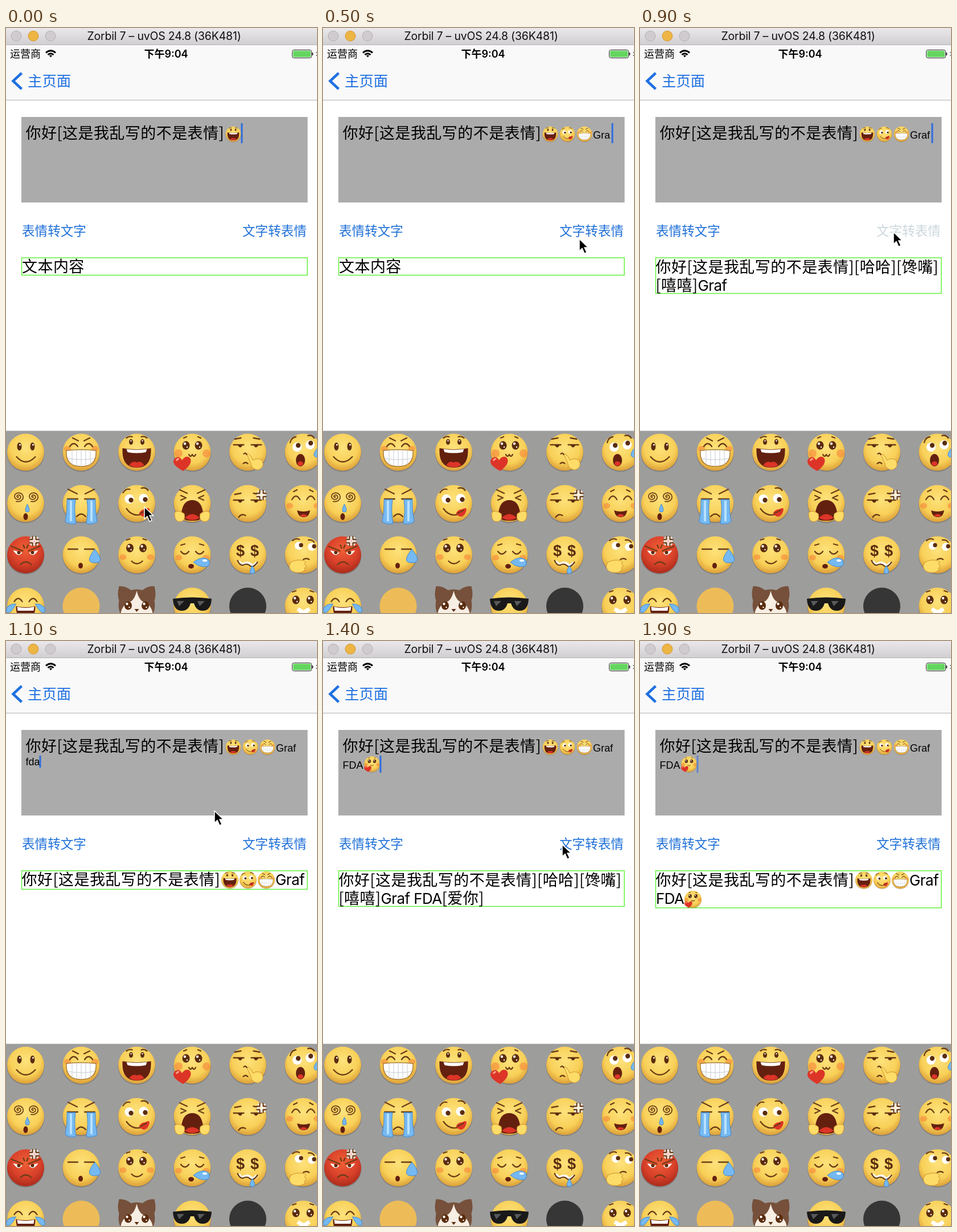
Animation of 546 by 1026 pixels, one loop 2 s. Source, as an HTML page:

```html
<!DOCTYPE html>
<html lang="zh-CN">
<head>
<meta charset="utf-8">
<title>表情键盘</title>
<style>
html, body { margin: 0; width: 100%; height: 100%; overflow: hidden; background: #fff; }
svg { display: block; }
text { font-family: "Noto Sans CJK SC", sans-serif; white-space: pre; }
.body { font-size: 27px; letter-spacing: .45px; }
.latin { font-family: Inter, "Noto Sans CJK SC", sans-serif; font-size: 26px; letter-spacing: -.6px; }
.small { font: 18px "Liberation Sans", sans-serif; }
.link { font-size: 22.6px; fill: #1f70d8; }
.line { fill: none; stroke: #6b3d16; stroke-width: 2.3; stroke-linecap: round; stroke-linejoin: round; }
.ink { fill: #5a2c0e; }
.mouth { fill: #64200f; }
.white { fill: #fff; }
.red { fill: #dd3428; }
.blush { fill: #f58038; opacity: .55; }
.tear { fill: #75b9f2; stroke: #4189d2; }
.hand { fill: #fddc68; stroke: #cf9130; }
.burst { fill: none; stroke: #fff; stroke-width: 5.5; }
</style>
</head>
<body>
<svg width="546" height="1026" viewBox="0 0 546 1026">
  <defs>
    <linearGradient id="bar" x2="0" y2="1"><stop stop-color="#ebe8eb"/><stop offset="1" stop-color="#d1ced1"/></linearGradient>
    <radialGradient id="skin" cy=".38" r=".64"><stop stop-color="#fde27c"/><stop offset=".65" stop-color="#f8d058"/><stop offset="1" stop-color="#d99a35"/></radialGradient>
    <radialGradient id="rage" cy=".35" r=".66"><stop stop-color="#ef6036"/><stop offset=".6" stop-color="#d9412a"/><stop offset="1" stop-color="#a92a1a"/></radialGradient>
    <g id="faces"></g>
  </defs>
  <rect width="546" height="1026" fill="#fff"/>
  <rect y="30" width="546" height="97" fill="#f9f9f9"/>
  <path d="M0 126.5H546" stroke="#b2b2b2"/>
  <rect width="546" height="30" fill="url(#bar)"/>
  <path d="M0 29.5H546" stroke="#b5b2b5"/>
  <g fill="#cfcbce" stroke="#b3b0b3">
    <circle cx="18" cy="14" r="9"/>
    <circle cx="48" cy="14" r="9" fill="#edb544" stroke="#d29a35"/>
    <circle cx="78" cy="14" r="9"/>
  </g>
  <text class="latin" x="277.5" y="21" text-anchor="middle" style="font-size:19.500px;letter-spacing:-.2px" fill="#111">Zorbil 7 – uvOS 24.8 (36K481)</text>
  <text x="7" y="52" font-size="18">运营商</text>
  <g fill="none" stroke="#000" stroke-width="3">
    <path d="M70 43.5Q78.500 36 87 43.5M73.500 47Q78.500 42.500 83.500 47"/>
    <path d="M76 48.500Q78.500 46.500 81 48.500L78.500 51.500Z" fill="#000" stroke="none"/>
  </g>
  <text x="281" y="51.500" text-anchor="middle" class="latin" style="font-size:18px;letter-spacing:0" font-weight="600">下午9:04</text>
  <rect x="502.5" y="38.5" width="34" height="14" rx="3" fill="#f9f9f9" stroke="#222"/>
  <rect x="504" y="40" width="31" height="11" rx="1.5" fill="#64d65f"/>
  <path d="M538 43v5q2-2.500 0-5M544.500 42l1.500 2M544.500 49l1.500-2" stroke="#222"/>
  <path d="M27.500 79L12.500 93L27.500 107" fill="none" stroke="#1f70e2" stroke-width="4.500"/>
  <text x="38" y="102" font-size="25.4" fill="#1f70e2">主页面</text>

  <rect x="27" y="156" width="502.500" height="150" fill="#ababab"/>
  <text class="body" x="34.500" y="194">你好[这是我乱写的不是表情]</text>
  <g id="draft"></g>
  <rect id="caret" width="3" fill="#2f6de0"/>
  <text class="link" id="toText" x="28" y="364">表情转文字</text>
  <text class="link" id="toFaces" x="415" y="364">文字转表情</text>
  <rect id="frame" x="27.500" y="403" width="501.500" fill="none" stroke="#62f23c" stroke-width="1.500"/>
  <g id="result"></g>

  <rect y="706.500" width="546" height="320" fill="#9d9d9c"/>
  <g id="keys"></g>
  <path id="mouse" d="M0 0V21L5 16.500L9 25.500L13 23.500L9 15H15.500Z" stroke="#fff" stroke-width="1.500"/>
</svg>
<script>
const $ = id => document.getElementById(id);
const shape = (cls, d) => `<path class="${cls}" d="${d}"/>`;
const line = d => shape('line', d);
const oval = (cls, x, y, rx, ry = rx) => `<ellipse class="${cls}" cx="${x}" cy="${y}" rx="${rx}" ry="${ry}"/>`;
const pair = (cls, x, y, rx, ry) => oval(cls, -x, y, rx, ry) + oval(cls, x, y, rx, ry);
const head = (fill = 'url(#skin)') =>
  `<ellipse cy="2" rx="33" ry="32.500" opacity=".18"/><circle r="32.500" fill="${fill}"/>`;
const blush = y => pair('blush', 24, y, 6, 5);
const round = (x, y, r = 6.5) => oval('ink', x, y, r, r + 1) + oval('white', x - 2, y - 3, 2.2) + oval('white', x + 2, y + 3, 1.2);
const stare = (x, y, dx, dy, r = 8) => oval('white', x, y, r) + oval('ink', x + dx, y + dy, r * .52);
const arcs = (x, y, h, w = 7) => [-x, x].map(c => line(`M${c - w} ${y}q${w} ${h} ${w * 2} 0`)).join('');
const lids = y => line(`M-25 ${y}h18M6 ${y}h18M-23 ${y - 10}l11 -2M10 ${y - 12}l11 2`) + shape('ink', `M-18 ${y}h9q-4 9 -9 0M10 ${y}h9q-5 9 -9 0`);
const drop = (x, y, s, w = 1.6) => shape('tear', `M${x} ${y - s}q${s * w} ${s * 2} 0 ${s * 2}q${-s * w} 0 0 ${-s * 2}`);
const burst = (x, y) => {
  const d = [[-1, -1], [1, -1], [-1, 1], [1, 1]].map(([a, b]) => `M${x + a * 3} ${y + b * 8}v${-b * 5}h${a * 5}`).join('');
  return shape('burst', d) + line(d);
};
const spiral = x => {
  let d = '';
  for (let a = 0; a < 15; a += .5) d += `${a ? 'L' : 'M'}${(x + a * .7 * Math.cos(a)).toFixed(1)} ${(-12 + a * .62 * Math.sin(a)).toFixed(1)}`;
  return `<path class="line" style="stroke-width:1.700" d="${d}"/>`;
};

const faces = [
  // first row
  head() + oval('ink', -11, -10, 4, 7) + oval('ink', 12, -10, 4, 7) + oval('white', -10, -13, 1.5) + oval('white', 13, -13, 1.5) + line('M-16 8Q0 26 17 8'),
  head() + blush(-6) + line('M-15 -25l10 5M15 -25l-10 5') + arcs(13, -10, -10) +
    '<path d="M-26 -3Q0 -6 26 -3Q28 25 0 25Q-28 25 -26 -3Z" fill="#fff" stroke="#a9782f" stroke-width="1.500"/><path d="M-24 11Q0 15 24 11M-16 -3v25M-8 -4v28M0 -4v29M8 -4v28M16 -3v25" fill="none" stroke="#c5cbd0"/>',
  head() + pair('ink', 10, -18, 3.5, 5) + pair('white', 10, -20, 1.2) + line('M-18 -25q5 -4 10 -2M18 -25q-5 -4 -10 -2') +
    shape('mouth', 'M-25 -7Q0 -3 25 -7Q27 27 0 27Q-27 27 -25 -7Z') + shape('white', 'M-18 -5.500Q0 -3 18 -5.500L16 0Q0 3 -16 0Z') + shape('red', 'M-13 23Q-8 14 0 18Q8 14 13 23Q0 30 -13 23Z'),
  head() + oval('blush', -24, 2, 7) + oval('blush', 25, 2, 7) + round(-11, -12) + round(11, -12) + line('M-15 -25l5 -2M15 -25l-5 -2M-6 4q3 6 6 0q3 6 6 0') +
    shape('red', 'M-16 33Q-39 21 -31 11Q-23 5 -18 14Q-11 4 -4 10Q2 20 -16 33Z') + '<path d="M-28 15q2-4 5-3" fill="none" stroke="#ff9d86" stroke-width="3"/>',
  head() + lids(-13) + line('M-8 20q4 -4 8 0') + shape('hand', 'M-2 3Q4 2 9 14Q17 9 25 14Q31 27 18 31Q6 30 5 19Z') + line('M-7 3q3 -3 5 1'),
  head() + line('M-23 -17q2 -9 10 -10M8 -29q7 -2 11 4') + stare(-11, -9, 2, -3) + stare(12, -13, 1, -3) + oval('mouth', -5, 14, 8, 11) + oval('red', -5, 20, 5, 4) + drop(26, 0, 9),
  // second row
  head() + spiral(-13) + spiral(13) + oval('mouth', 0, 23, 4, 6) + drop(3, 8, 7, 1),
  head() + line('M-23 -25l16 8M23 -25l-16 8M-24 -8h18M6 -8h18M-8 23q8 -9 16 0') +
    ['M-25 -7h15q-3 20 1 42q-10 3 -19 -3q4 -20 3 -39', 'M25 -7h-15q3 20 -1 42q10 3 19 -3q-4 -20 -3 -39'].map(d => shape('tear', d)).join('') +
    '<path d="M-18 -5v36M18 -5v36" stroke="#b8e1ff" stroke-width="4"/>',
  head() + line('M-24 -19q5 -8 12 -6M8 -27q8 -2 12 4') + stare(-13, -8, 3, 2) + stare(12, -9, 3, 2) + line('M-18 9Q-7 25 12 18') +
    shape('red', 'M4 18Q7 10 15 10Q24 5 22 13Q18 26 9 22Z') + line('M7 17L17 12'),
  head() + line('M-22 -24l13 6M22 -24l-13 6M-20 -14l9 4l-9 4M20 -14l-9 4l9 4') + shape('mouth', 'M0 -6Q16 -6 19 16Q20 31 0 30Q-20 31 -19 16Q-16 -6 0 -6Z') +
    shape('red', 'M-13 25Q0 12 13 25Q0 33 -13 25Z') + shape('hand', 'M-31 16Q-24 10 -14 18Q-11 30 -21 32Q-32 32 -31 16ZM31 16Q24 10 14 18Q11 30 21 32Q32 32 31 16Z'),
  head() + lids(-6) + line('M-16 24q5 -7 12 -3') + burst(24, -15),
  head() + blush(4) + arcs(13, -7, -12) + line('M-17 -21l6 -3M17 -21l-6 -3') + shape('mouth', 'M-11 12Q0 16 12 12Q10 25 0 24Q-9 24 -11 12Z') + shape('red', 'M-6 21Q0 16 7 21Q0 26 -6 21Z'),
  // third row
  head('url(#rage)') + line('M-25 -15L-5 -7M25 -15L5 -7M-4 -17l2 5M4 -17l-2 5') + shape('white', 'M-22 -8L-6 -4Q-13 6 -22 -8ZM22 -8L6 -4Q13 6 22 -8Z') +
    pair('ink', 12, -4, 3) + line('M-9 17Q0 8 10 17') + burst(15, -24),
  head() + line('M-23 -10h17M6 -10h17') + oval('mouth', -1, 19, 4, 5) + drop(24, 2, 12),
  head() + blush(4) + round(-12, -12) + round(11, -12) + line('M-18 -26l6 -2M17 -26l-6 -2M-9 11Q0 20 10 11'),
  head() + blush(5) + arcs(13, -6, 9) + line('M-20 -17l7 -2M20 -17l-7 -2') + oval('mouth', -2, 20, 5, 4) + shape('tear', 'M2 13Q18 0 29 9Q34 22 19 21Q10 20 2 13Z') + oval('white', 22, 10, 4, 2),
  head() + ['-13', '12'].map(x => `<text class="ink" x="${x}" y="2" text-anchor="middle" style="font:700 27px 'Liberation Sans',sans-serif">$</text>`).join('') +
    '<path d="M-16 11q4 7 9 5q7 -4 13 2q6 2 10 -5" fill="none" stroke="#fff" stroke-width="5"/>' + line('M-18 10q4 9 10 8q7 -4 13 2q6 2 12 -7') + drop(8, 26, 7, 1.2),
  head() + stare(-8, -16, 4, -1, 7) + stare(15, -14, 4, -1, 7) + line('M-19 -25q6 -5 12 -2M9 -26q7 -1 10 4M0 8q6 -3 10 0') +
    shape('hand', 'M-22 13Q-11 7 0 10Q7 12 2 16Q8 20 2 23Q5 28 -5 31Q-23 33 -25 20Z'),
  // fourth row
  head() + arcs(13, -8, -11) + shape('mouth', 'M-17 0Q0 4 17 0Q17 24 0 24Q-17 24 -17 0Z') + shape('white', 'M-15 1Q0 5 15 1L14 8H-14Z') + shape('tear', 'M-17 -4Q-34 -4 -34 9Q-28 17 -17 -4ZM17 -4Q34 -4 34 9Q28 17 17 -4Z'),
  '<circle r="32.500" fill="#edbc58"/>',
  '<path d="M-31 -35Q-20 -36 -10 -28Q0 -31 10 -28Q20 -36 31 -35Q35 -20 31 -10Q37 24 0 30Q-37 24 -31 -10Q-35 -20 -31 -35Z" fill="#76503a"/><path d="M0 -27Q4 -10 13 -7Q31 1 28 24H-28Q-31 1 -13 -7Q-4 -10 0 -27Z" fill="#f7eee4"/>' +
    round(-15, -1) + round(15, -1) + shape('ink', 'M-4 5h8l-4 5Z'),
  head() + '<path d="M-34 -13Q0 -18 34 -13Q33 9 17 8Q6 7 3 -5H-3Q-6 7 -17 8Q-33 9 -34 -13Z" fill="#191919"/><path d="M-27 -9h13L-23 0ZM9 -9h13L13 0Z" fill="#58595a"/>',
  '<circle r="32.500" fill="#363636"/>',
  head() + round(-13, -11) + round(12, -11) + line('M-19 -25l6 -2M18 -25l-6 -2') + '<path d="M-10 5L11 17M11 5L-10 17" stroke="#fff" stroke-width="7"/>'
];
$('faces').innerHTML = faces.map((f, i) => `<g id="face${i}">${f}</g>`).join('');

const face = (i, x, y, s = 1) => `<use href="#face${i}" transform="translate(${x} ${y}) scale(${s})"/>`;
const label = (cls, x, y, s) => `<text class="${cls}" x="${x}" y="${y}">${s}</text>`;
const latin = s => `<tspan class="latin">${s}</tspan>`;
const LAUGH = 2, LOVE = 3, picked = [LAUGH, 8, 1];
$('keys').innerHTML = faces.map((_, i) => face(i, 34.5 + i % 6 * 97.5, 744 + Math.floor(i / 6) * 90)).join('');

// Timelines: each entry holds from its time until the next one.
const mouse = [[0, 243, 840], [200, 132, 752], [300, 450, 370], [600, 270, 362], [700, 102, 356], [800, 270, 360], [900, 445, 358],
  [1000, 366, 298], [1200, 324, 752], [1300, 102, 356], [1400, 420, 357], [1600, 134, 356], [1700]];
// time, faces, first word, second word, closing face
const draft = [[0, 1, '', ''], [100, 2, '', ''], [200, 3, '', ''], [400, 3, 'G', ''], [500, 3, 'Gra', ''], [600, 3, 'Graf', ''],
  [1000, 3, 'Graf', 'f'], [1100, 3, 'Graf', 'fda'], [1200, 3, 'Graf', 'FDA', true]];
const result = [[0, 'empty'], [700, 'text'], [1000, 'faces'], [1300, 'textLong'], [1500, 'facesLong']];
const blink = [[0, 1], [1500, .5], [1600, 0], [1800, .2], [1900, .6]];
const at = (list, t) => list.filter(e => e[0] <= t).pop().slice(1);

const intro = '你好[这是我乱写的不是表情]';
const tagged = tail => label('body', 27.5, 429, intro + '[哈哈][馋嘴]') + label('body', 27.5, 460.5, '[嘻嘻]' + tail);
const faced = y => label('body', 27.5, y, intro) + picked.map((f, i) => face(f, 393 + i * 32, y - 9, .46)).join('') + label('latin', 473, y, 'Graf');
const views = {
  empty: [30.5, label('body', 28, 428, '文本内容')],
  text: [62.5, tagged(latin('Graf'))],
  faces: [32.5, faced(428)],
  textLong: [62.5, tagged(latin('Graf FDA') + '[爱你]')],
  facesLong: [65, faced(428.5) + label('latin', 28, 461, 'FDA') + face(LOVE, 93, 453, .46)]
};

function place(el, attrs) {
  for (const k in attrs) el.setAttribute(k, attrs[k]);
}

function draw(t) {
  const [count, first, second, love] = at(draft, t);
  const wordX = 384 + count * 30;
  $('draft').innerHTML = picked.slice(0, count).map((f, i) => face(f, 399 + i * 30, 186, .41)).join('') +
    label('small', wordX, 194, first) + label('small', 34.5, love ? 224 : 218, second) + (love ? face(LOVE, 86, 216, .42) : '');
  const words = $('draft').querySelectorAll('text');
  const end = love ? 99.5 : second ? 33.5 + words[1].getComputedTextLength() : wordX - 1.5 + (first ? words[0].getComputedTextLength() + 4 : 0);
  place($('caret'), { x: end, y: second ? 201 : 167, height: love ? 30 : second ? 21 : 35, opacity: at(blink, t)[0] });

  const [height, content] = views[at(result, t)[0]];
  $('frame').setAttribute('height', height);
  $('result').innerHTML = content;
  $('toText').style.fill = t === 700 || t === 1300 ? '#cbd7dc' : '';
  $('toFaces').style.fill = t === 900 ? '#cbd7dc' : '';

  const [x, y] = at(mouse, t);
  place($('mouse'), { transform: `translate(${x || 0} ${y || 0})`, opacity: x ? 1 : 0 });
}

let shown = -1;
function tick() {
  const t = Math.floor(performance.now() % 2000 / 100) * 100;
  if (t !== shown) draw(shown = t);
  requestAnimationFrame(tick);
}
tick();
</script>
</body>
</html>
```
